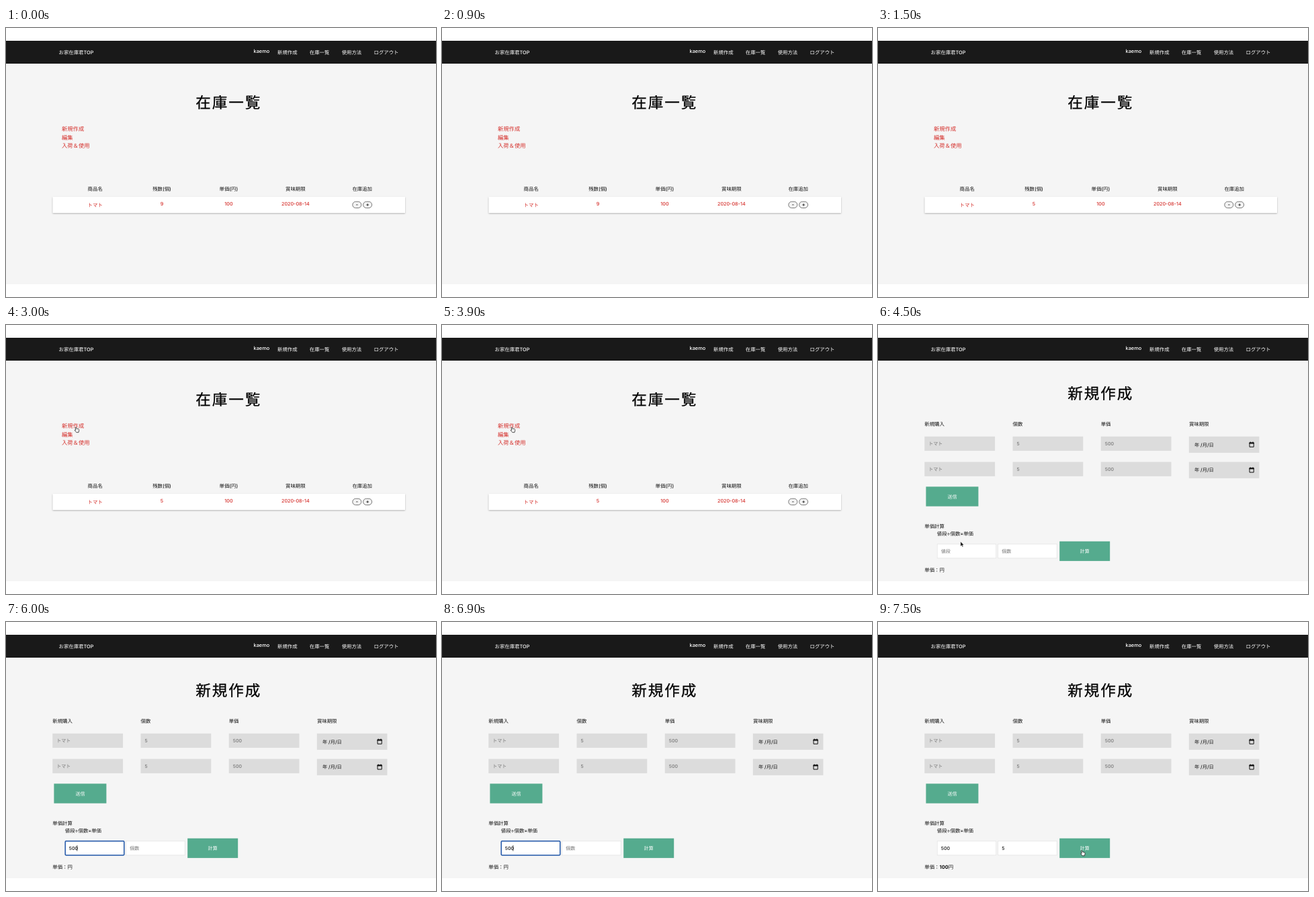
An HTML page that plays this animation: 640 by 400 pixels, repeating every 8000 ms.

```html
<!DOCTYPE html>
<html>
<head>
<meta charset="utf-8">
<title>在庫一覧</title>
<style>
  html, body { margin: 0; width: 100%; height: 100%; overflow: hidden; background: #fff; }
  svg { display: block; width: 100%; height: 100%; }
  text {
    font-family: Inter, "Noto Sans CJK JP", "Noto Sans CJK", sans-serif;
    font-weight: 500;
    text-rendering: geometricPrecision;
    white-space: pre;
  }
</style>
</head>
<body>
<svg id="stage" viewBox="0 0 640 400"></svg>
<script>
const stage = document.getElementById('stage');
const LOOP = 8000, STEP = 1500;
const INK = '#151515', RED = '#d5302c', GREEN = '#55ab8e', GREY = '#777';

// Text placed by its vertical centre.
const text = (x, cy, content, { size = 7.4, fill = INK, anchor = 'start', extra = '' } = {}) =>
  `<text x="${x}" y="${cy + size * 0.37}" font-size="${size}" fill="${fill}" text-anchor="${anchor}" ${extra}>${content}</text>`;
const centred = (x, cy, content, options = {}) => text(x, cy, content, { anchor: 'middle', ...options });
const rect = (x, y, w, h, fill, extra = '') =>
  `<rect x="${x}" y="${y}" width="${w}" height="${h}" fill="${fill}" ${extra}/>`;

const title = (cy, content) => text(282.3, cy, content, {
  size: 22.6, fill: '#000', extra: 'letter-spacing="1.9" stroke="#000" stroke-width=".25"'
});

const header = () =>
  rect(0, 19, 640, 362, '#f5f5f5') + rect(0, 19, 640, 34, '#191919') +
  text(78.5, 35.8, 'お家在庫君TOP', { fill: '#fff' }) +
  [[368.5, 34.6, 'kaemo'], [404, 35.8, '新規作成'], [451.8, 35.8, '在庫一覧'],
   [499.7, 35.8, '使用方法'], [547.5, 35.8, 'ログアウト']]
    .map(([x, y, label]) => text(x, y, label, { fill: '#fff' })).join('');

const pill = (x, sign) =>
  rect(x, 258.2, 13, 9.4, '#f3f3f3', 'rx="4.7" stroke="#777" stroke-width="1"') +
  centred(x + 6.5, 262.9, sign, { size: 7, extra: 'style="font-weight:700"' });

function listPage(stock) {
  const columns = [132.7, 232, 331.4, 430.8, 530.2];
  const labels = ['商品名', '残数(個)', '単価(円)', '賞味期限', '在庫追加'];
  const values = ['トマト', stock, '100', '2020-08-14'];
  return title(110.5, '在庫一覧') +
    ['新規作成', '編集', '入荷＆使用'].map((label, i) =>
      text(83, 150.3 + i * 12.4, label, { size: 8.3, fill: RED })).join('') +
    labels.map((label, i) => centred(columns[i], 239.2, label)).join('') +
    rect(69.5, 251, 524.5, 24, '#fff', 'style="filter:drop-shadow(0 1px 1.2px #0004)"') +
    values.map((value, i) => centred(columns[i], i ? 261.8 : 263, value, { size: i ? 7.2 : 7.4, fill: RED })).join('') +
    pill(515.8, '-') + pill(531.6, '+');
}

const calendar = y =>
  `<path d="M553 ${y + 1.5}h6.2v6.2h-6.2z" fill="none" stroke="#111"/>` +
  rect(552.5, y + 1, 7.2, 2, '#111') + rect(553.7, y, 1, 1.5, '#111') + rect(557.5, y, 1, 1.5, '#111');

const entryRow = y =>
  [[69.3, 'トマト'], [200.5, '5'], [331.7, '500']].map(([x, hint]) =>
    rect(x, y, 104.8, 21.3, '#dcdcdc') + text(x + 6, y + 10.6, hint, { size: 7, fill: GREY })).join('') +
  rect(462.8, y, 104.6, 24.3, '#dcdcdc') +
  text(471, y + 12.1, '年 /月/日', { size: 7.2 }) + calendar(y + 7.8);

const button = (x, y, w, label) =>
  rect(x, y, w, 29.2, GREEN) + centred(x + w / 2, y + 14.6, label, { size: 7, fill: '#fff' });

function calcField(x, value, hint, focused) {
  const border = focused ? 'stroke="#2056a8" stroke-width="1.5" rx="1.2"' : 'stroke="#e4e4e4" stroke-width=".8"';
  return rect(x, 325.8, 87.6, 21, '#fff', border) +
    text(x + 5.6, 336.4, value || hint, { size: 7, fill: value ? INK : GREY }) +
    (focused ? rect(105.5, 332, 0.7, 8.6, '#000') : '');
}

function formPage({ price = '', count = '', focus = false, result = '' }) {
  const labels = ['新規購入', '個数', '単価', '賞味期限'];
  return title(101.5, '新規作成') +
    labels.map((label, i) => text(69.3 + i * 131.2, 147.2, label)).join('') +
    entryRow(165.8) + entryRow(203.6) +
    button(71.4, 240.4, 78, '送信') +
    text(69.3, 299.4, '単価計算') + text(87.8, 310.4, '値段÷個数=単価') +
    calcField(88.2, price, '値段', focus) + calcField(178.6, count, '個数', false) +
    button(270.2, 321.7, 75, '計算') +
    text(69.3, 364.3, `単価：<tspan style="font-weight:700">${result}</tspan>円`);
}

const arrow = (x, y) =>
  `<path transform="translate(${x} ${y})" d="M0 0V7.2L1.7 5.7 2.8 8.2 4.1 7.6 3 5.2H5.2Z" fill="#111" stroke="#fff" stroke-width=".6"/>`;
const hand = (x, y) =>
  `<path transform="translate(${x} ${y})" d="M1 .5Q1.8-.2 2.3.8L2.9 2.4 5.5 2.8Q6.7 3.2 6.5 5L5.8 8H2.6L.2 5.1Q-.2 4 1 4.2L1.7 4.6Z" fill="#fff" stroke="#222" stroke-width=".8" stroke-linejoin="round"/>`;

const scenes = [
  () => listPage('9'),
  () => listPage('5'),
  () => listPage('5') + hand(102.2, 151.7),
  () => formPage({}) + arrow(122.8, 322),
  () => formPage({ price: '500', focus: true }),
  () => formPage({ price: '500', count: '5', result: '100' }) + hand(301.6, 339.6)
];

let shown = -1;
function draw(now) {
  const scene = Math.floor((now % LOOP) / STEP);
  if (scene !== shown) {
    shown = scene;
    stage.innerHTML = header() + scenes[scene]();
  }
  requestAnimationFrame(draw);
}
draw(performance.now());
</script>
</body>
</html>
```
